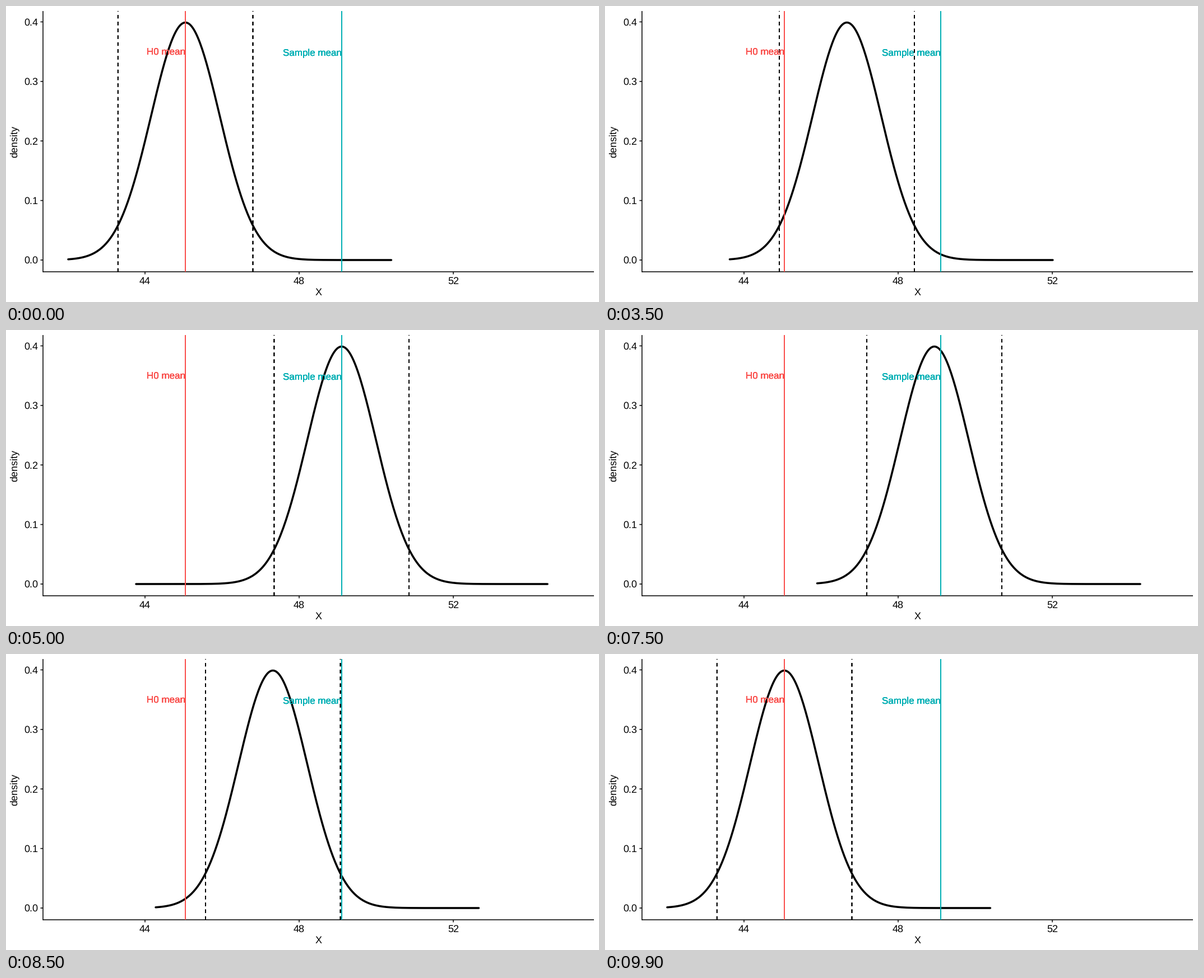
A matplotlib script that plays this animation: 1058x529 px, repeating every 10000 ms.

```python
import numpy as np
import matplotlib.pyplot as plt
from matplotlib.animation import FuncAnimation

WIDTH, HEIGHT, DPI = 1058, 529, 64
PX = 72 / DPI                       # points per pixel
FRAMES, INTERVAL = 100, 100

LEFT, RIGHT, TOP, BOTTOM = 66, 1049, 9, 475
ZERO, UNIT = 454.0, 1064.0          # y of density 0, pixels per unit density
H0_X, SAMPLE_X = 320.1, 598.8
SIGMA = 61.3
CRITICAL = 120.4                    # distance of the dashed limits from the mean
TAIL_LEFT, TAIL_RIGHT, WIDE_LEFT = 209.1, 367.3, 366.8

RED, TEAL = "#FA4F4C", "#00AFB4"
THIN, THICK = 1.53, 3.6
AXIS_TEXT, LABEL_TEXT = 17.5, 16.5
COPIES = 5                          # marks are overplotted, which hardens their edges

plt.rcParams["font.family"] = "Liberation Sans"
plt.rcParams["text.hinting"] = "none"
plt.rcParams["text.hinting_factor"] = 1

fig = plt.figure(figsize=(WIDTH / DPI, HEIGHT / DPI), dpi=DPI, facecolor="white")
ax = fig.add_axes([0, 0, 1, 1])
ax.set_xlim(0, WIDTH)
ax.set_ylim(HEIGHT, 0)
ax.axis("off")


def line(xs, ys, width=THIN, color="black", **style):
    style.setdefault("solid_capstyle", "butt")
    return ax.plot(xs, ys, color=color, lw=width * PX, snap=False, **style)[0]


def upright(x, **style):
    return [line([x, x], [BOTTOM, TOP], **style) for _ in range(COPIES)]


def text(x, y, label, size=AXIS_TEXT, ha="center", **style):
    return ax.text(x, y, label, fontsize=size * PX, ha=ha, va="baseline", **style)


def draw_axes():
    line([LEFT, LEFT], [TOP, BOTTOM + THIN / 2], zorder=1)
    line([LEFT, RIGHT], [BOTTOM, BOTTOM], zorder=1)
    for i in range(5):
        y = ZERO - UNIT * i / 10
        line([LEFT - 4.5, LEFT], [y, y], zorder=1)
        text(57, y + 6.2, f"{i / 10:.1f}", ha="right")
    for i, value in enumerate((44, 48, 52)):
        x = 248 + 275 * i
        line([x, x], [BOTTOM, BOTTOM + 4.5], zorder=1)
        text(x, 497, str(value))
    text(557.5, 516.6, "X")
    text(20, 242, "density", rotation=90, rotation_mode="anchor")


def draw_mean(x, label, color):
    upright(x, color=color, zorder=4)
    for _ in range(COPIES):
        text(x - 0.3, 88, label, LABEL_TEXT, "right", color=color, zorder=5)


draw_axes()
draw_mean(H0_X, "H0 mean", RED)
draw_mean(SAMPLE_X, "Sample mean", TEAL)

curve = line([], [], THICK, zorder=2, solid_capstyle="round", solid_joinstyle="round")
dashed = dict(zorder=3, linestyle=(0, (4, 4)), dash_capstyle="butt")
lower, upper = upright(0, **dashed), upright(0, **dashed)


def update(n):
    # rest at H0, glide to the sample mean, rest, glide back
    shift = np.clip(min(n - 25, 99 - n) / 25, 0, 1)
    mean = H0_X + (SAMPLE_X - H0_X) * shift
    reach = WIDE_LEFT if shift == 1 else TAIL_LEFT
    x = np.linspace(mean - reach, mean + TAIL_RIGHT, 300)
    density = np.exp(-((x - mean) / SIGMA) ** 2 / 2) / np.sqrt(2 * np.pi)
    curve.set_data(x, ZERO - UNIT * density)
    for limits, side in ((lower, -1), (upper, 1)):
        for limit in limits:
            limit.set_xdata([mean + side * CRITICAL] * 2)
    return [curve, *lower, *upper]


anim = FuncAnimation(fig, update, frames=FRAMES, interval=INTERVAL,
                     repeat=True, repeat_delay=0, blit=False)
plt.show()
```
